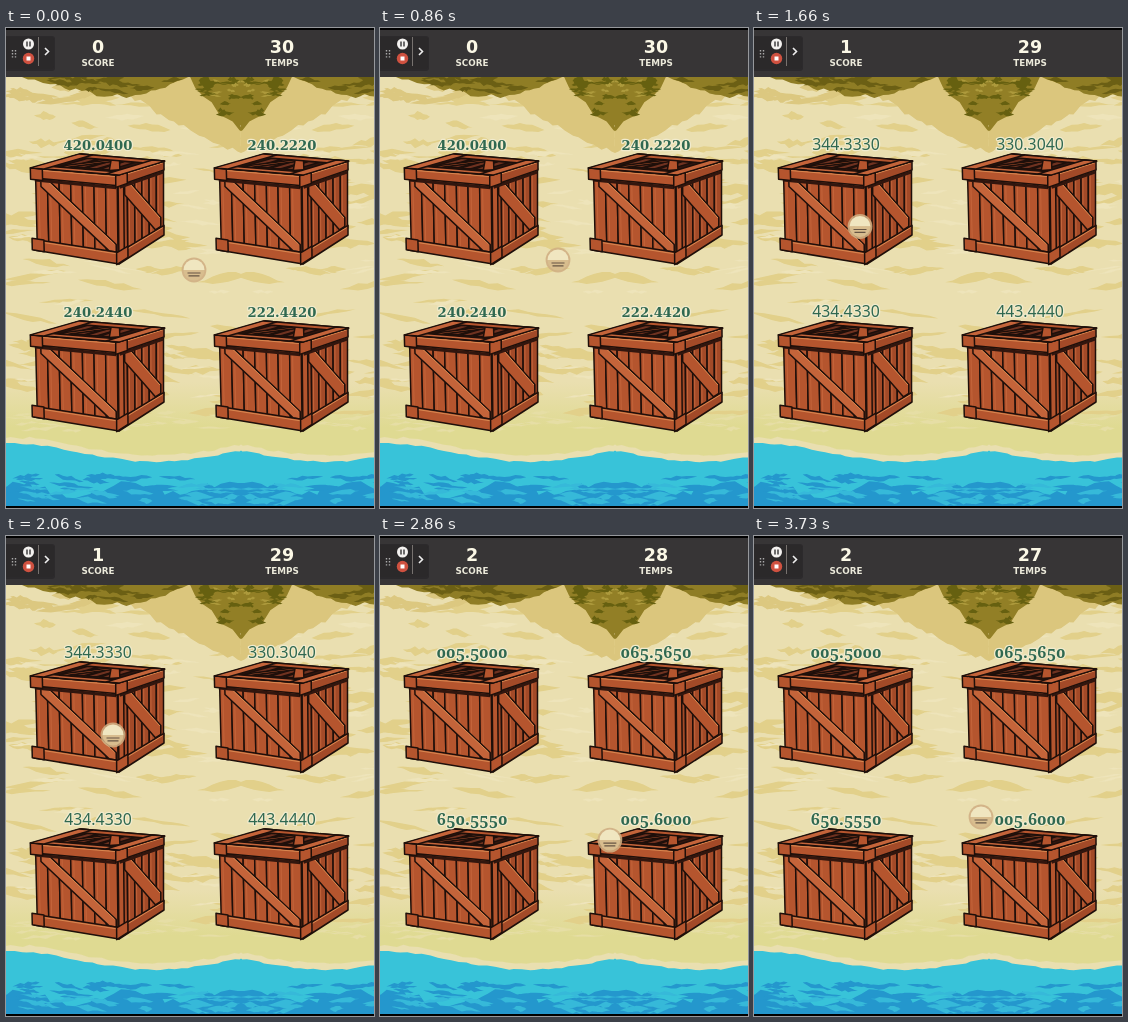
An HTML page that plays this animation: 368 px wide and 480 px high, repeating every 3800 ms.

```html
<!DOCTYPE html>
<html lang="fr">
<head>
<meta charset="utf-8">
<title>Caisses</title>
<style>
html, body { margin: 0; width: 100%; height: 100%; overflow: hidden; background: #000; }
svg { display: block; width: 368px; height: 480px; }
text { text-anchor: middle; }
.hud { font: bold 8.8px "DejaVu Sans", sans-serif; fill: #eceadb; }
.hud .big { font-size: 17.5px; fill: #fbf8e6; }
.tag { fill: #2f6850; stroke: #f1ebcd; stroke-width: 2.6px; stroke-linejoin: round; paint-order: stroke; }
.set0 { font: bold 13.2px "DejaVu Serif", serif; }
.set1 { font: 500 15.8px "Noto Sans", sans-serif; }
.set2 { font: 600 16.2px "Noto Serif", serif; font-variant-numeric: oldstyle-nums; }
</style>
</head>
<body>
<svg viewBox="0 0 368 480">
  <defs>
    <linearGradient id="sand" x1="0" y1="49" x2="0" y2="430" gradientUnits="userSpaceOnUse">
      <stop offset=".8" stop-color="#eadfb0"/>
      <stop offset=".92" stop-color="#dfda92"/>
    </linearGradient>
    <clipPath id="half"><path d="M0 49H235.5V478H0Z"/></clipPath>
    <g id="shore" clip-path="url(#half)"></g>
    <g id="crate" stroke="#1e0f0a" stroke-width="1.5" stroke-linejoin="round"></g>
  </defs>
  <path fill="url(#sand)" d="M0 49H368V478H0Z"/>
  <use href="#shore"/>
  <use href="#shore" transform="translate(470) scale(-1 1)"/>
  <path fill="#000" d="M0 478H368V480H0ZM0 0H368V2H0Z"/>
  <path fill="#373536" d="M0 2H368V49H0Z"/>
  <g class="hud">
    <text class="big" id="score" x="92" y="25">0</text>
    <text x="92" y="37.5">SCORE</text>
    <text class="big" id="time" x="276" y="25">30</text>
    <text x="276" y="37.5">TEMPS</text>
  </g>
  <rect x="-4" y="8" width="53" height="35" rx="3" fill="#262425" opacity=".6"/>
  <rect x="-4" y="9" width="52" height="32" rx="3" fill="#2b292a"/>
  <path d="M6.5 22v8M9.5 22v8" stroke="#aaa" stroke-width="1.4" stroke-dasharray="1.4 1.7"/>
  <circle cx="22.5" cy="16" r="5.5" fill="#f4f2f0"/>
  <path d="M21 13.5v5M24 13.5v5" stroke="#333" stroke-width="1.4"/>
  <circle cx="22.5" cy="30.5" r="5.7" fill="#cf5140"/>
  <path fill="#fff" d="M20.5 28.5h4v4h-4z"/>
  <path d="M32.5 9v29" stroke="#77726f"/>
  <path d="M39 20l3.5 3.5-3.5 3.5" fill="none" stroke="#eee" stroke-width="1.6"/>
  <g id="crates"></g>
  <g id="cursor">
    <circle r="12.4" fill="#cfae82" opacity=".88"/>
    <path d="M-10.5 0A10.5 10.5 0 0 1 10.5 0Z" fill="#f0e6c0"/>
    <path d="M-10.5 0A10.5 10.5 0 0 0 10.5 0Z" fill="#d8bd8e"/>
    <path d="M-6.5 3H6.5M-5.5 5.8H5.5" stroke="#665544" stroke-width="1.2"/>
    <circle id="ring" r="13" fill="none" stroke="#e03426" stroke-width="2" stroke-dasharray="5 1.8"/>
  </g>
</svg>
<script>
const NS = 'http://www.w3.org/2000/svg';
const $ = id => document.getElementById(id);
function add(parent, name, attrs) {
  const el = document.createElementNS(NS, name);
  for (const k in attrs) el.setAttribute(k, attrs[k]);
  return parent.appendChild(el);
}

let seed = 41;
const rnd = () => (seed = seed * 16807 % 2147483647) / 2147483647;
const span = (a, b) => a + rnd() * (b - a);

// Ragged lens shape
function streak(x, y, w, h, lean) {
  const top = [], low = [], n = 7;
  for (let i = 0; i <= n; i++) {
    const u = i / n, swell = Math.sin(Math.PI * u) * h / 2;
    const px = (x + (u - .5) * w).toFixed(1), py = y + (u - .5) * w * lean;
    top.push(px + ' ' + (py - swell * span(.2, 1.4)).toFixed(1));
    low.unshift(px + ' ' + (py + swell * span(.2, 1.4)).toFixed(1));
  }
  return 'M' + top.concat(low).join('L') + 'Z';
}
function streaks(parent, n, x0, x1, yAt, w, h, fill) {
  let d = '';
  for (let i = 0; i < n; i++) {
    const x = span(x0, x1);
    d += streak(x, yAt(x), span(.5, 1.5) * w, span(.5, 1.5) * h, span(-.15, .25));
  }
  add(parent, 'path', { d, fill });
}
// Area between a level and a rough curve
function band(parent, x0, x1, level, curve, rough, fill) {
  const pts = [[x0, level]];
  for (let x = x0; x < x1; x += span(4, 9)) pts.push([x, curve(x) + span(-rough, rough)]);
  pts.push([x1, curve(x1)], [x1, level]);
  add(parent, 'polygon', { points: pts.join(' '), fill });
}

function drawShore(g) {
  const mid = 235, top = 49;
  const valley = x => top + 76 * ((x - 100) / 135) ** .8;
  const bush = x => top + 19 * Math.sin(Math.PI * Math.max(0, (x - 15) / 170) ** 1.3);
  const wedge = x => top + 54 * ((x - 183) / 52) ** .8;
  const tide = x => 424.5 - 9.5 * Math.cos(Math.PI * x / 150);
  const inside = curve => x => span(top, curve(x) - 3);
  const within = (a, b) => () => span(a, b);

  streaks(g, 110, 0, mid, within(68, 385), 44, 7, '#e2d08a');
  streaks(g, 35, 0, mid, within(75, 375), 30, 4, '#eee4ba');
  streaks(g, 18, 0, mid, within(384, 408), 30, 3, '#e6dea5');
  band(g, 100, mid, top, valley, 3, '#dbc67d');
  streaks(g, 16, 0, 110, within(50, 74), 36, 7, '#dcc880');
  band(g, 15, 185, top, bush, 2.5, '#8f7d25');
  streaks(g, 16, 50, 170, inside(bush), 22, 5, '#6b5f14');
  band(g, 183, mid, top, wedge, 3, '#927f26');
  streaks(g, 18, 196, mid, inside(wedge), 14, 6, '#666010');
  streaks(g, 6, 208, mid, inside(wedge), 9, 3, '#ad9a3c');

  band(g, 0, mid, 478, x => tide(x) - 6, 1.5, '#e9dfb0');
  band(g, 0, mid, 478, tide, 1, '#38c3d9');
  band(g, 0, mid, 478, x => 461 - 6 * Math.cos((x - mid) / 18), 4, '#2497cd');
  streaks(g, 16, 0, mid, within(447, 462), 26, 5, '#2497cd');
  streaks(g, 26, 0, mid, within(456, 476), 24, 4, '#36b9d9');
}

// Point on a four-cornered face: u runs a to b, v runs a to d
const face = (a, b, c, d) => (u, v) => [0, 1].map(k =>
  ((a[k] * (1 - u) + b[k] * u) * (1 - v) + (d[k] * (1 - u) + c[k] * u) * v).toFixed(1));

function drawCrate(g) {
  const left = [26, 140], near = [112, 147], right = [158, 133], back = [75, 126], foot = [113, 236];
  const front = face(left, near, foot, [28, 222]);
  const side = face(near, right, [158, 207], foot);
  const lid = face(back, right, near, left);
  const wood = '#b5552e', lit = '#c4643a', dim = '#a34a28', dark = '#32160e', glow = '#d98850';

  const quad = (f, corners, fill) => add(g, 'polygon', { points: corners.map(c => f(...c)).join(' '), fill });
  const slab = (f, u0, u1, v0, v1, fill) => quad(f, [[u0, v0], [u1, v0], [u1, v1], [u0, v1]], fill);
  const line = (f, u0, v0, u1, v1, stroke, width = 1) =>
    add(g, 'path', { d: `M${f(u0, v0)}L${f(u1, v1)}`, stroke, 'stroke-width': width });
  const brace = (f, u0, v0, u1, v1, w, fill) => {
    quad(f, [[u0, v0], [u0 + w, v0], [u1, v1 - w], [u1, v1], [u1 - w, v1], [u0, v0 + w]], fill);
    line(f, u0 + w, v0 + .02, u1 - .02, v1 - w, glow);
  };
  const planks = (f, n, fill) => {
    for (let i = 0; i < n; i++) {
      const u = .04 + .95 * i / n;
      slab(f, u, u + .95 / n, .1, .9, fill);
      line(f, u + .25 / n, .16, u + .25 / n, .86, lit);
    }
  };
  const rails = (f, fill) => {
    line(f, .03, .145, .98, .145, dark, 3);
    slab(f, 0, 1, 0, .12, fill);
    slab(f, 0, 1, .87, 1, fill);
    for (const v of [.02, .89]) line(f, .03, v, .97, v, glow);
  };

  planks(side, 6, dim);
  brace(side, .14, .13, .93, .86, .12, wood);
  planks(front, 7, wood);
  brace(front, .1, .13, .97, .87, .085, lit);
  slab(side, 0, .12, .1, .9, wood);
  rails(side, dim);
  rails(front, wood);
  for (const v of [0, .86]) {
    slab(front, -.02, .12, v, v + .14, wood);
    slab(side, -.05, .2, v, v + .13, wood);
  }

  slab(lid, 0, 1, 0, 1, dark);
  for (let u = .2; u < .8; u += .15) slab(lid, u, u + .12, .2, .75, '#6f3220');
  quad(lid, [[.18, .8], [.3, .8], [.58, .15], [.48, .15]], wood);
  quad(lid, [[.45, .15], [.55, .15], [.86, .7], [.78, .78]], wood);
  slab(lid, 0, 1, 0, .2, wood);
  slab(lid, .02, 1, .83, 1, lit);
  slab(lid, -.02, .14, 0, 1, lit);
  slab(lid, .86, 1.01, 0, 1, lit);
}

drawShore($('shore'));
drawCrate($('crate'));

const tags = [[0, 0], [184, 0], [0, 167], [184, 167]].map(([x, y]) => {
  add($('crates'), 'use', { href: '#crate', x, y });
  return add($('crates'), 'text', { x: 92 + x, y: 122 + y });
});

const LOOP = 3800, STEP = 200 / 3, ROUND = 1400;
const rounds = [
  '420.0400 240.2220 240.2440 222.4420',
  '344.3330 330.3040 434.4330 443.4440',
  '005.5000 065.5650 650.5550 005.6000'
];
// Time, x, y
const route = [
  [0, 188, 242], [860, 178, 232], [1260, 105, 198], [2060, 107, 199],
  [2530, 224, 309], [3200, 236, 299], [3730, 227, 281]
];

function along(t) {
  const i = Math.max(1, route.findIndex(p => p[0] >= t));
  const [a, b] = [route[i - 1], route[i]];
  const u = (t - a[0]) / (b[0] - a[0]), k = u * u * (3 - 2 * u);
  return [1, 2].map(j => a[j] + (b[j] - a[j]) * k);
}
function put(el, s) {
  if (el.textContent !== s) el.textContent = s;
}

function draw(now) {
  const n = Math.floor((now % LOOP + 7) / STEP) % 57;
  const t = Math.floor(n * STEP / 10 + 1e-6) * 10;
  const round = Math.floor(t / ROUND);
  const labels = rounds[round].split(' ');
  tags.forEach((el, i) => {
    put(el, labels[i]);
    el.setAttribute('class', 'tag set' + round);
  });
  put($('score'), String(round));
  put($('time'), String(30 - Math.max(0, Math.floor((t - 400) / 1000))));
  $('cursor').setAttribute('transform', `translate(${along(t)})`);
  const phase = t % ROUND;
  $('ring').style.display = phase >= 1200 && phase < 1340 ? '' : 'none';
}

const start = performance.now();
function loop() {
  draw(performance.now() - start);
  requestAnimationFrame(loop);
}
loop();
</script>
</body>
</html>
```
